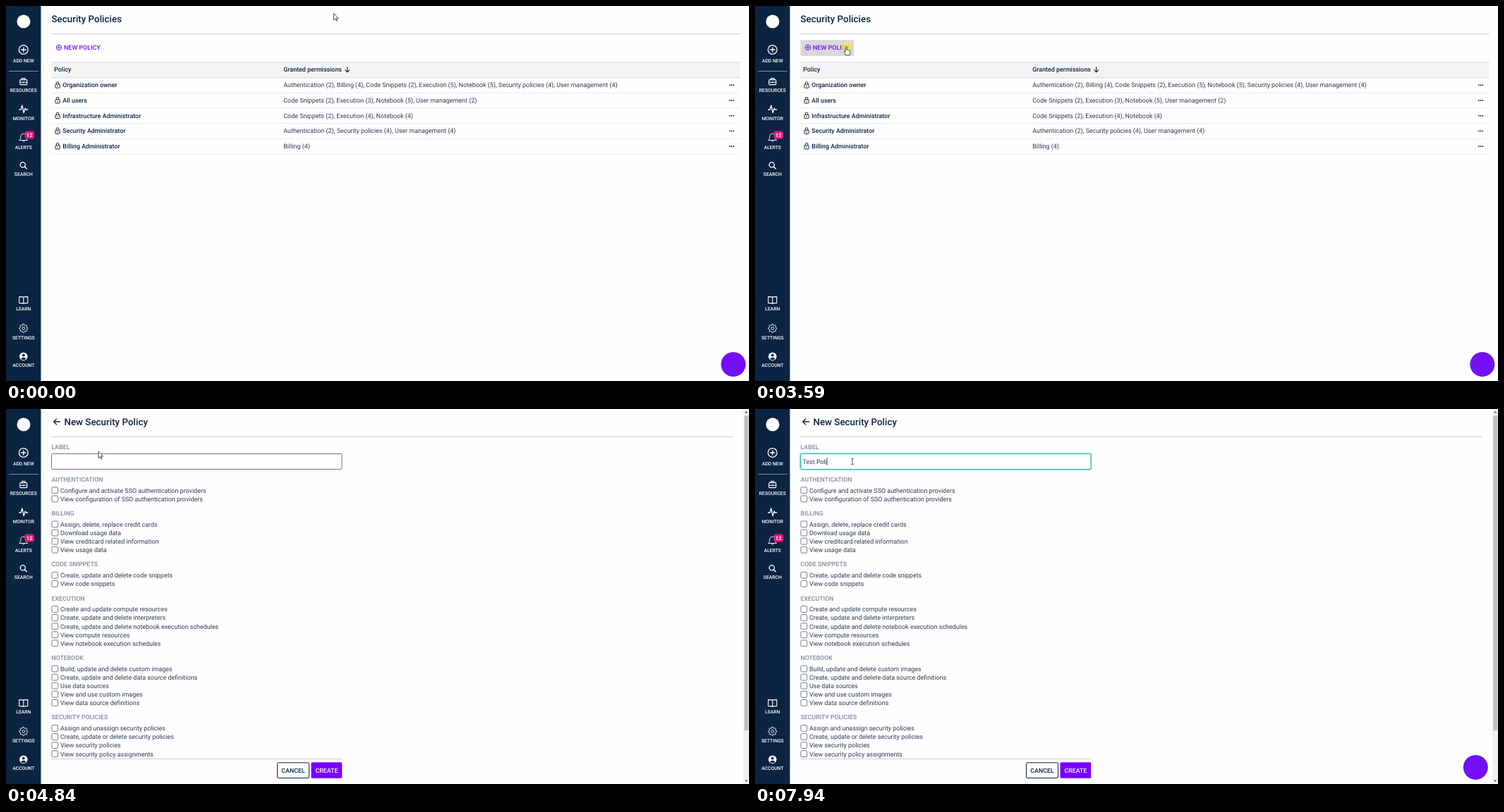
An HTML page for the animation above (8000 ms loop, 1053 by 532 pixels).

```html
<!DOCTYPE html>
<html lang="en">
<head>
<meta charset="utf-8">
<title>Security Policies</title>
<style>
  html, body { margin: 0; width: 100%; height: 100%; overflow: hidden; background: #fefefe; }
  svg { display: block; }
  text { font: 400 8.95px Roboto, sans-serif; fill: #2c3a50; white-space: pre; text-rendering: geometricPrecision; }
  .medium { font-size: 8.9px; font-weight: 500; fill: #0a2442; }
  .title { font-size: 13.38px; }
  .heading { font-size: 8.77px; fill: #7d8a99; }
  .nav { font-size: 6.8px; fill: #fff; text-anchor: middle; }
  .badge { font-size: 7.6px; font-weight: 700; fill: #fff; text-anchor: middle; }
  .purple { font-size: 8.95px; fill: #6f0df2; }
  .button { font-size: 8.85px; text-anchor: middle; }
  .status { font: 6.7px "Open Sans", sans-serif; fill: #555b63; }
  .line { fill: none; stroke-linecap: round; stroke-linejoin: round; }
</style>
</head>
<body>
<svg id="stage" width="1053" height="532" viewBox="0 0 1053 532"></svg>
<script>
const NAVY = '#0a2442', PURPLE = '#6f0df2';

const text = (x, y, content, cls = '') => `<text x="${x}" y="${y}" class="${cls}">${content}</text>`;
const rect = (x, y, w, h, attrs) => `<rect x="${x}" y="${y}" width="${w}" height="${h}" ${attrs}/>`;
const circle = (x, y, r, attrs) => `<circle cx="${x}" cy="${y}" r="${r}" ${attrs}/>`;
const line = (d, color, width = 1) => `<path class="line" d="${d}" stroke="${color}" stroke-width="${width}"/>`;
const outline = (color, width = 1) => `fill="none" stroke="${color}" stroke-width="${width}"`;

function sidebar() {
  const labels = [['ADD NEW', 79.8], ['RESOURCES', 122], ['MONITOR', 161.5], ['ALERTS', 203],
    ['SEARCH', 241], ['LEARN', 432], ['SETTINGS', 472.5], ['ACCOUNT', 512]];
  let gear = '';
  for (let i = 0; i < 32; i++) {
    const angle = (i - 0.5) * Math.PI / 16, radius = i % 4 < 2 ? 6.1 : 4.6;
    gear += `${i ? 'L' : 'M'}${24.8 + radius * Math.sin(angle)} ${457.3 - radius * Math.cos(angle)}`;
  }
  return rect(0, 0, 49.5, 532, `fill="${NAVY}"`)
    + circle(25, 22, 9.5, 'fill="#fff"')
    + circle(24.8, 62, 6.4, outline('#fff', 1.3)) + line('M24.8 58.8v6.4M21.6 62h6.4', '#fff', 1.3)
    + line('M4.5 92.5H45.5', '#8995a5', 0.9)
    + rect(19.8, 104.6, 10, 7, 'rx="1" ' + outline('#fff', 1.1))
    + line('M22.5 104.5v-1.9h4.6v1.9M19.8 108.2h10M24.8 107.5v1.4', '#fff', 1.1)
    + line('M18.8 147h2.3l1.8-6 2.3 10.5 2-6.5 1.1 2h2.5', '#fff', 1.3)
    + line('M19 190.3c1.6-1 1.9-2.7 1.9-5 0-2.5 1.5-4.2 3.8-4.2s3.8 1.7 3.8 4.2c0 2.3.3 4 1.9 5zM23.3 190.5c.2 2.6 2.8 2.6 3 0', '#fff', 0.9)
    + rect(26.5, 177.6, 13.4, 10.8, 'rx="3" fill="#ea1677"') + text(33.2, 185.7, '12', 'badge')
    + circle(23.8, 225.2, 3.6, outline('#fff', 1.3)) + line('M26.5 228l2.8 2.8', '#fff', 1.4)
    + line('M24.8 413.3c-1-.9-2-.9-6-.9v9c4 0 5 0 6 .9 1-.9 2-.9 6-.9v-9c-4 0-5 0-6 .9v9', '#fff', 1.1)
    + line(gear + 'z', '#fff', 0.9) + circle(24.8, 457.3, 1.9, outline('#fff', 0.9))
    + circle(24.8, 497.2, 5.8, 'fill="#fff"') + circle(24.8, 495.5, 1.9, `fill="${NAVY}"`)
    + `<path d="M21.2 500.4c1-2.3 6.2-2.3 7.2 0-1.6 2.2-5.6 2.2-7.2 0z" fill="${NAVY}"/>`
    + labels.map(([label, y]) => text(24.8, y, label, 'medium nav')).join('');
}

function policyList() {
  const rows = [
    ['Organization owner', 'Authentication (2), Billing (4), Code Snippets (2), Execution (5), Notebook (5), Security policies (4), User management (4)'],
    ['All users', 'Code Snippets (2), Execution (3), Notebook (5), User management (2)'],
    ['Infrastructure Administrator', 'Code Snippets (2), Execution (4), Notebook (4)'],
    ['Security Administrator', 'Authentication (2), Security policies (4), User management (4)'],
    ['Billing Administrator', 'Billing (4)']];
  const row = ([name, permissions], i) => {
    const y = 112.3 + i * 21.68;
    return rect(70, y - 1.3, 6.2, 5.2, 'rx=".7" ' + outline(NAVY, 1))
      + line(`M71.3 ${y - 1.4}v-1.4a1.8 1.8 0 0 1 3.6 0v1.4`, NAVY, 1)
      + circle(73.1, y + 1.3, 0.8, `fill="${NAVY}"`)
      + text(80.3, y + 3, name, 'medium') + text(393.3, y + 3, permissions)
      + [1025.7, 1028.4, 1031.1].map(x => circle(x, y, 0.95, `fill="${NAVY}"`)).join('')
      + line(`M64.5 ${y + 11}H1040`, '#e6e8eb', 0.8);
  };
  return text(64.5, 22.6, 'Security Policies', 'medium title')
    + line('M64.5 39.5H1040', '#c9cdd2')
    + rect(64.5, 48.3, 75.5, 22.5, 'id="hover" rx="1"')
    + circle(75, 58.9, 3.7, outline(PURPLE)) + line('M75 57v3.8M73.1 58.9h3.8', PURPLE)
    + text(82, 62.1, 'NEW POLICY', 'medium purple')
    + rect(64.5, 80, 975.5, 21.7, 'fill="#f3f4f5"')
    + line('M64.5 79.8H1040M64.5 101.8H1040', '#d2d6da', 0.9)
    + text(68.2, 93.3, 'Policy', 'medium') + text(393.3, 93.3, 'Granted permissions', 'medium')
    + line('M483.7 86.7v7M480.7 90.8l3 3 3-3', NAVY, 1.1)
    + rows.map(row).join('');
}

function policyForm() {
  const sections = {
    'AUTHENTICATION': ['Configure and activate SSO authentication providers', 'View configuration of SSO authentication providers'],
    'BILLING': ['Assign, delete, replace credit cards', 'Download usage data', 'View creditcard related information', 'View usage data'],
    'CODE SNIPPETS': ['Create, update and delete code snippets', 'View code snippets'],
    'EXECUTION': ['Create and update compute resources', 'Create, update and delete interpreters',
      'Create, update and delete notebook execution schedules', 'View compute resources', 'View notebook execution schedules'],
    'NOTEBOOK': ['Build, update and delete custom images', 'Create, update and delete data source definitions',
      'Use data sources', 'View and use custom images', 'View data source definitions'],
    'SECURITY POLICIES': ['Assign and unassign security policies', 'Create, update or delete security policies',
      'View security policies', 'View security policy assignments']
  };
  let y = 99.8, body = '';
  for (const [heading, options] of Object.entries(sections)) {
    body += text(64.5, y + 3.1, heading, 'medium heading');
    y += 15.6;
    for (const option of options) {
      body += rect(64.9, y - 4.5, 8.8, 8.8, 'rx="1.6" ' + outline('#66707c', 0.9)) + text(77, y + 3.3, option);
      y += 12.1;
    }
    y += 8.35;
  }
  return line('M76.5 18H67.7M71.7 13.9l-4.1 4.1 4.1 4.1', NAVY, 1.3)
    + text(82.4, 22.6, 'New Security Policy', 'medium title')
    + line('M64.5 39.5H1030', '#c9cdd2')
    + text(64.5, 56.9, 'LABEL', 'medium heading')
    + rect(64.5, 63.5, 411.5, 22, 'id="glow" rx="2" fill="none" stroke="#20c5b8" stroke-opacity=".3" stroke-width="4"')
    + rect(64.5, 63.5, 411.5, 22, 'id="field" rx="2" fill="#fff"')
    + '<text id="typed" x="67.5" y="77.6"></text>' + rect(67.2, 69, 0.8, 11, 'id="caret" fill="#222"')
    + body
    + line('M64.5 496.4H476', '#c9cdd2')
    + rect(384.5, 501.8, 45, 21.7, 'rx="1.5" ' + outline(NAVY)) + text(407, 515.7, 'CANCEL', 'medium button')
    + rect(432.5, 501.3, 43.7, 22.5, 'rx="1.5" fill="#7800ff"')
    + '<text x="454.4" y="515.7" class="medium button" style="fill:#fff">CREATE</text>'
    + rect(1045, 0, 8, 532, 'fill="#f1f1f1"') + rect(1046.3, 9.5, 6.2, 446.5, 'fill="#bfbfbf"')
    + '<path d="M1047 5.5h4.4l-2.2-2.6zM1047 526.5h4.4l-2.2 2.6z" fill="#555"/>';
}

const pointers = `
  <path id="arrow" d="M0 0v9.5l2.2-2 1.5 3.3 1.4-.6-1.5-3.2h2.9z" fill="#fff" stroke="#222" stroke-width=".8"/>
  <path id="hand" d="M-1.4 6.8V1.6C-1.4.4.4.4.4 1.6V5c.4-.6 1.5-.5 1.7.3.5-.5 1.4-.3 1.6.5.6-.3 1.3.1 1.3.9v2.6c0 1.3-.8 1.9-.9 3.2H-.9C-1.3 10.8-3.6 8.5-3.6 7.3c0-1 1.4-1.1 2.2.3z" fill="#fff" stroke="#222" stroke-width=".8"/>
  <path id="beam" d="M-1.8-4Q0-4 0-3.2Q0-4 1.8-4M0-3.2V3.6M-1.8 4.4Q0 4.4 0 3.6Q0 4.4 1.8 4.4" fill="none" stroke="#333" stroke-width=".9"/>`;

document.getElementById('stage').innerHTML = rect(0, 0, 1053, 532, 'fill="#fefefe"')
  + `<g id="list">${policyList()}</g><g id="form">${policyForm()}</g>${sidebar()}`
  + circle(0, 508.4, 17.5, 'id="chat" fill="#7310f5"')
  + `<g id="status">${rect(0, 520.3, 351, 12, 'fill="#dee1e6"')}${text(2.5, 529.2, 'Waiting for app.qivu.com...', 'status')}</g>`
  + `<g id="cursor">${circle(0, 1, 6.7, 'id="click" fill="#f2ec35" fill-opacity=".75"')}${pointers}</g>`;

const el = id => document.getElementById(id);
const show = (id, visible) => { el(id).style.display = visible ? '' : 'none'; };

const linear = p => p;
const easeInOut = p => p < 0.5 ? 2 * p * p : 1 - 2 * (1 - p) ** 2;
const moves = [
  { start: 880, end: 1580, steps: 10, from: [464.5, 10.5], to: [335.5, 10.5], sag: 6, ease: easeInOut },
  { start: 1810, end: 2590, steps: 11, from: [335.5, 10.5], to: [146.5, 46], sag: 0, ease: easeInOut },
  { start: 2670, end: 2900, steps: 4, from: [146.5, 46], to: [129.7, 57.3], sag: 0, ease: linear },
  { start: 4840, end: 5210, steps: 6, from: [129.7, 57.3], to: [138, 74.2], sag: 0, ease: linear }
];

// The pointer is sampled in discrete steps, as in a screen recording.
function pointerAt(t) {
  const move = moves.filter(m => t >= m.start).pop();
  if (!move) return moves[0].from;
  const { start, end, steps, from, to, sag, ease } = move;
  const step = Math.floor((t - start) / (end - start) * (steps - 1) + 1e-6) + 1;
  const p = Math.min(1, step / steps), q = ease(p);
  return [from[0] + (to[0] - from[0]) * q, from[1] + (to[1] - from[1]) * q + sag * Math.sin(Math.PI * p)];
}

const LABEL = 'Test Poli';
const keyTimes = [6220, 6620, 6850, 7000, 7080, 7480, 7640, 7860, 7940];
const FOCUS = 5460, BLINK = 530;

function render(t) {
  const onList = t < 3830, onForm = t >= 4140, focused = t >= FOCUS;
  show('list', onList);
  show('form', onForm);
  show('status', t >= 3910 && t < 4215);
  show('chat', onList || t >= 5000);
  el('chat').setAttribute('cx', onList ? 1030.8 : 1021.3);

  const [x, y] = pointerAt(t);
  const hand = t >= 2740 && t < 3910, beam = onForm && y > 64;
  const pressed = t >= 3590 && t < 3680;
  el('cursor').setAttribute('transform', `translate(${x} ${y})`);
  show('hand', hand);
  show('beam', beam);
  show('arrow', !hand && !beam);
  show('click', pressed || t >= FOCUS && t < 5530);
  el('hover').setAttribute('fill', !hand ? 'none' : pressed ? '#d8d8d8' : '#e2e2e2');

  el('field').setAttribute('stroke', focused ? '#16b3a8' : '#66758a');
  show('glow', focused);
  const count = keyTimes.filter(time => t >= time).length;
  const lastInput = count ? keyTimes[count - 1] : FOCUS;
  const typed = el('typed');
  typed.textContent = LABEL.slice(0, count);
  show('caret', focused && Math.floor((t - lastInput) / BLINK) % 2 === 0);
  if (onForm) el('caret').setAttribute('x', 67.2 + (count ? typed.getComputedTextLength() : 0));
}

const began = performance.now();
function tick() {
  render((performance.now() - began) % 8000);
  requestAnimationFrame(tick);
}
tick();
</script>
</body>
</html>
```
